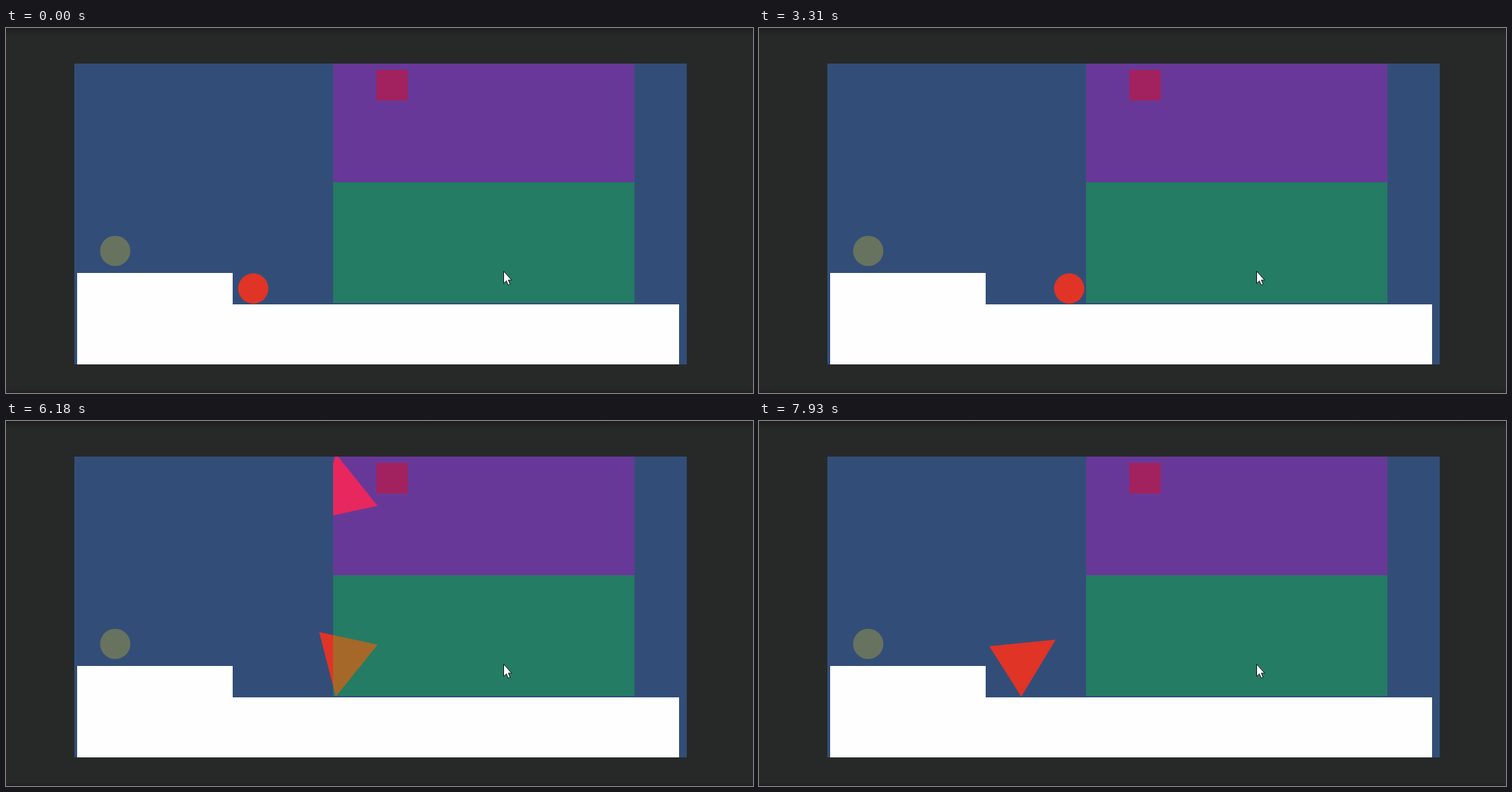
Recreate the animation shown at these times as an HTML page with a canvas. Size 1071x523 px, loop 8000 ms.

```html
<!DOCTYPE html>
<html lang="en">
<head>
<meta charset="utf-8">
<title>Rolling shapes</title>
<style>
  html, body { margin: 0; width: 100%; height: 100%; overflow: hidden; background: #272928; }
  canvas { display: block; }
</style>
</head>
<body>
<canvas id="stage" width="1071" height="523"></canvas>
<script>
const ctx = document.getElementById('stage').getContext('2d');
const LOOP = 8000;
const GROUND = 395;
const RADIUS = 21.7;
const BASE = 85.5;
const SIDE = BASE * Math.sqrt(1.25);
const APEX = 2 * Math.atan(0.5);
const BASE_ANGLE = Math.atan(2);
const MIRROR = 442;

const GREEN = [469, 221, 432, 173];
const PURPLE = [469, 51, 432, 170];
const SQUARE = [531, 60, 45, 44];

// [time in ms, simulation step]
const CLOCK = [[940, 0], [1760, 12], [2610, 24], [3450, 36], [4290, 48], [5130, 60],
               [5970, 72], [6830, 85], [7650, 97], [8000, 102]];
// [steps since the tip began, angle in degrees]
const ROLL = [[0, 0], [5, 2.5], [9, 10.8], [12, 24.7], [17, 58.9], [24, 119.3], [25, 127]];

const MORPH = 58;   // the ball turns into a triangle
const LAND = 84;    // the triangle lands on its second side

function segment(table, x) {
  let i = 0;
  while (i < table.length - 2 && x >= table[i + 1][0]) i++;
  return i;
}

function stepAt(t) {
  const i = segment(CLOCK, t);
  const [t0, n0] = CLOCK[i], [t1, n1] = CLOCK[i + 1];
  return Math.floor(n0 + (t - t0) / (t1 - t0) * (n1 - n0) + 0.001);
}

// Smooth curve through the roll table
function rollAngle(k) {
  k = Math.max(0, Math.min(25, k));
  const i = segment(ROLL, k);
  const slope = j => {
    const a = ROLL[Math.max(0, j - 1)], b = ROLL[Math.min(ROLL.length - 1, j + 1)];
    return j ? (b[1] - a[1]) / (b[0] - a[0]) : 0;
  };
  const [x0, y0] = ROLL[i], [x1, y1] = ROLL[i + 1];
  const w = x1 - x0, u = (k - x0) / w, v = 1 - u;
  const deg = v * v * (1 + 2 * u) * y0 + u * u * (3 - 2 * u) * y1
            + w * u * v * (v * slope(i) - u * slope(i + 1));
  return deg * Math.PI / 180;
}

function ball(x) {
  const p = new Path2D();
  p.arc(x, 373.3, RADIUS, 0, 2 * Math.PI);
  return p;
}

// Two sides leave the pivot corner at the given angle and spread
function triangle(x, angle, spread, len1, len2) {
  const p = new Path2D();
  p.moveTo(x, GROUND);
  p.lineTo(x + len1 * Math.cos(angle), GROUND - len1 * Math.sin(angle));
  p.lineTo(x + len2 * Math.cos(angle + spread), GROUND - len2 * Math.sin(angle + spread));
  p.closePath();
  return p;
}

function shapeAt(t) {
  if (t < 940) {
    const moves = Math.max(0, Math.min(5, Math.floor((t - 130) / 70) + 1));
    return ball(354.5 - 1.4 * moves);
  }
  const n = stepAt(t);
  if (n < MORPH) {
    const m = n + 1;
    return ball(347.5 + 2.88 * (m - 1.25 * (1 - Math.exp(-m / 1.25))));
  }
  if (n < LAND) {
    const slip = Math.max(0, n - 68) / 6;
    return triangle(474 - slip, rollAngle(n - 59), APEX, SIDE, SIDE);
  }
  return triangle(376, rollAngle(n - LAND), BASE_ANGLE, SIDE, BASE);
}

function rect(color, box) {
  ctx.fillStyle = color;
  ctx.fillRect(...box);
}

function clipTo(box) {
  ctx.beginPath();
  ctx.rect(...box);
  ctx.clip();
}

function paint(color, path) {
  ctx.fillStyle = color;
  ctx.fill(path);
}

const shade = ctx.createLinearGradient(0, 0, 0, 523);
[[0, '#1c1d1d'], [0.022, '#272928'], [0.989, '#272928'], [1, '#202121']]
  .forEach(([at, color]) => shade.addColorStop(at, color));

const coin = new Path2D();
coin.arc(156.6, 319.4, RADIUS, 0, 2 * Math.PI);
const arrow = new Path2D('M713.5 348.5V366L717.4 362.3L720 368.4L722.8 367.2L720.2 361.2H725Z');

function draw(t) {
  const shape = shapeAt(t);
  rect(shade, [0, 0, 1071, 523]);
  rect('#324e78', [98, 51, 878, 431]);
  paint('#67735e', coin);
  paint('#e03427', shape);
  rect('#fefefe', [102, 351, 223, 131]);
  rect('#fefefe', [102, 396, 863, 86]);
  rect('#247c64', GREEN);
  rect('#683898', PURPLE);
  rect('#a2225f', SQUARE);

  ctx.save();
  clipTo(GREEN);
  paint('#a56828', shape);
  ctx.restore();

  // Reflection in the upper panel
  ctx.save();
  clipTo(PURPLE);
  ctx.transform(1, 0, 0, -1, 0, MIRROR);
  paint('#e8275f', shape);
  ctx.clip(shape);
  ctx.transform(1, 0, 0, -1, 0, MIRROR);
  rect('#f31a38', SQUARE);
  ctx.restore();

  paint('#fff', arrow);
  ctx.strokeStyle = '#111';
  ctx.lineWidth = 1;
  ctx.stroke(arrow);
}

const start = performance.now();
function tick() {
  draw((performance.now() - start) % LOOP);
  requestAnimationFrame(tick);
}
tick();
</script>
</body>
</html>
```
